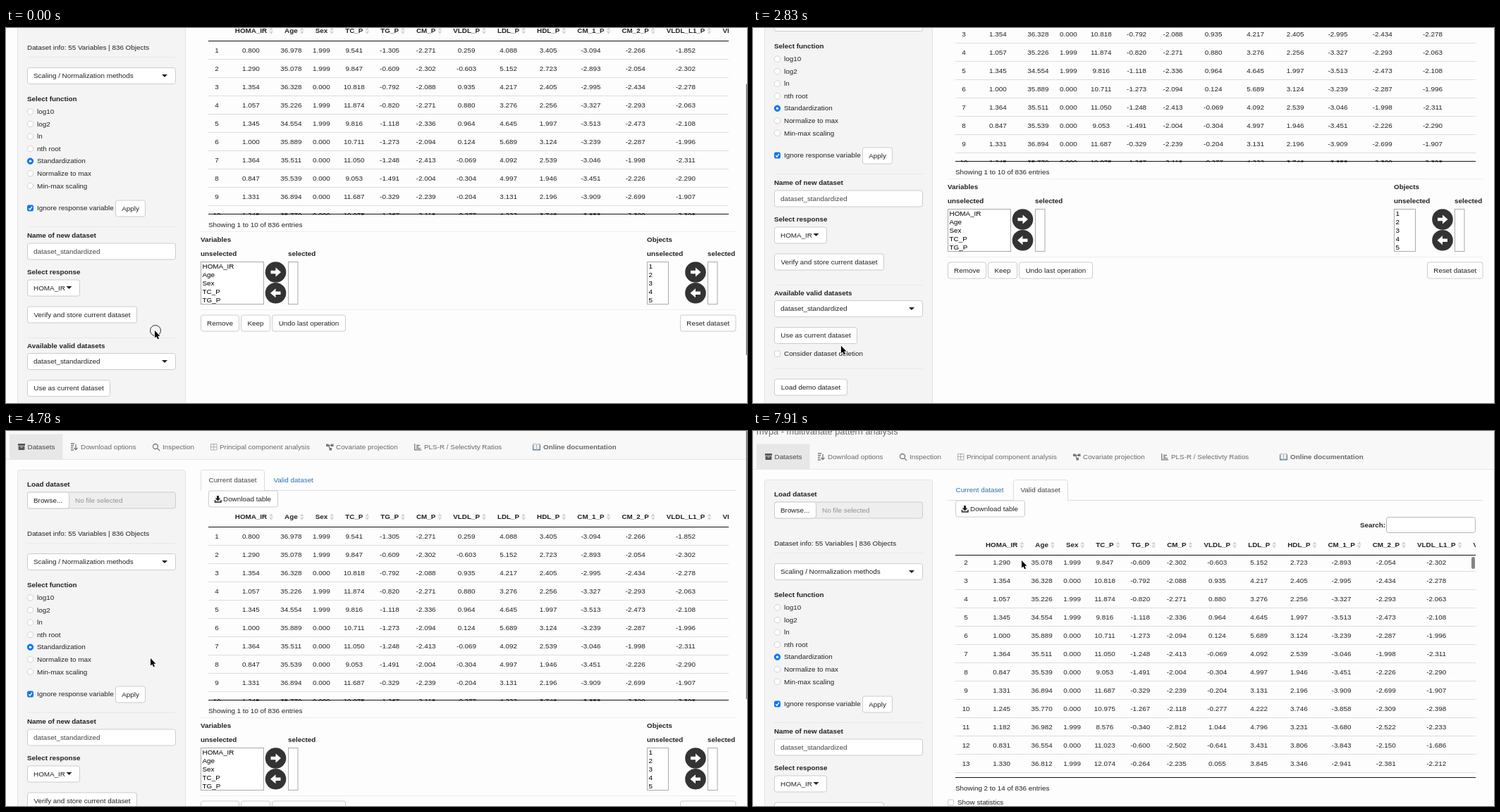
These frames come from a looping animation (1051x533 px, 8000 ms). An HTML page:

```html
<!DOCTYPE html>
<html lang="en">
<head>
<meta charset="utf-8">
<title>mvpa</title>
<style>
  html, body { margin: 0; width: 100%; height: 100%; overflow: hidden; background: #fdfdfd; }
  #stage { display: block; }
  text { font: 9.9px "Liberation Sans", Arial, sans-serif; fill: #222; white-space: pre; }
  .b { font-weight: bold; font-size: 9.84px; }
  .mid { text-anchor: middle; }
  .nav { fill: #696969; }
  .on, .input { fill: #444; }
  .hint { fill: #929292; }
  .link { fill: #2a70b0; }
  .option { fill: #000; }
  .brand { fill: #696969; font-size: 12.75px; }
</style>
</head>
<body>
<svg id="stage" width="1051" height="533"></svg>
<script>
const LOOP = 8000, STEP = 150;
const BG = '#fdfdfd', BLUE = '#0a76f5';

// Text and boxes are placed by their vertical centre.
const text = (x, y, s, cls = '') => `<text x="${x}" y="${y + 3.2}" class="${cls}">${s}</text>`;
const bold = (x, y, s) => text(x, y, s, 'b');
const path = (d, attrs = '') => `<path d="${d}" ${attrs}/>`;
const line = (x1, x2, y, color) => path(`M${x1} ${y}H${x2}`, `stroke="${color}"`);
const box = (x1, x2, y, h = 23, fill = '#fff', stroke = '#ccc', r = 3) =>
  `<rect x="${x1}" y="${y - h / 2}" width="${x2 - x1}" height="${h}" rx="${r}" fill="${fill}" stroke="${stroke}"/>`;
const disc = (x, y, r, fill, stroke = 'none') =>
  `<circle cx="${x}" cy="${y}" r="${r}" fill="${fill}" stroke="${stroke}"/>`;
const button = (x1, x2, y, label) => box(x1, x2, y) + text((x1 + x2) / 2, y, label, 'mid');
const caret = (x, y) => path(`M${x - 4} ${y - 2}h8l-4 4z`, 'fill="#222"');
const hr = y => line(30, 241, y, '#e9e9e9');
const clip = (x, y, w, h, body) =>
  `<svg x="${x}" y="${y}" width="${w}" height="${h}" viewBox="${x} ${y} ${w} ${h}">${body}</svg>`;

const checkbox = (x, y, label, on) =>
  box(x, x + 8, y, 8, on ? BLUE : '#fff', on ? BLUE : '#ccc', 1.5) +
  (on ? path(`M${x + 1.8} ${y + .2}l1.7 1.9 3-4.2`, 'fill="none" stroke="#fff" stroke-width="1.4"') : '') +
  text(x + 13.5, y, label);
const radio = (y, label, on) =>
  disc(34.5, y, 4.2, on ? BLUE : '#fff', on ? BLUE : '#d2d2d2') +
  (on ? disc(34.5, y, 1.8, '#fff') : '') + text(44, y, label);
const select = (y, label) => box(30.5, 240.5, y) + text(39, y, label) + caret(225, y);

const navbar = () => {
  const stroke = 'fill="none" stroke="#777" stroke-width="1.3"';
  return `<rect y="-60" width="1051" height="114" fill="#f8f8f8"/>` + line(0, 1051, 54.5, '#e7e7e7') +
    `<rect x="5" y="18.5" width="75.5" height="36" fill="#e7e7e7"/>` +
    text(5, 2, 'mvpa - multivariate pattern analysis', 'brand') +
    path('M17 32h10v2.7h-10zM17.6 35.4h8.8v5.6h-8.8z', 'fill="#555"') + line(20.5, 23.5, 37, '#e7e7e7') +
    text(30.5, 37, 'Datasets', 'on') +
    path('M92 32h5M92 35h4M92 38h3M92 41h4M99 33v7M96.5 38l2.5 2.5 2.5-2.5', stroke) +
    text(106, 37, 'Download options', 'nav') +
    path('M215 39l3 3', stroke) + `<circle cx="212" cy="36" r="3.5" ${stroke}/>` +
    text(222, 37, 'Inspection', 'nav') +
    path('M290.5 32.5h8.5v8.5h-8.5zM294.7 32.5v8.5M290.5 36.7h8.5',
      'fill="none" stroke="#888" stroke-width=".8" stroke-dasharray="1.5 .5"') +
    text(303, 37, 'Principal component analysis', 'nav') +
    path('M456 34.5h6M457 34.5l3 5', stroke) +
    path('M454 32.5h3.5v3.5h-3.5zM461 32.5h3.5v3.5h-3.5zM458.5 38h3.5v3.5h-3.5z', 'fill="#777"') +
    text(468, 37, 'Covariate projection', 'nav') +
    path('M579.7 32v8.8h9.5M582 34.5h5M582 36.6h3M582 38.7h6', stroke) +
    text(593, 37, 'PLS-R / Selectivty Ratios', 'nav') +
    path('M747 33.5h11v8h-11z', 'fill="#4a7fa5"') +
    path('M748 32.5q3-1 4.5 .8q1.5-1.8 4.5-.8v7.8q-3-.8-4.5 .7q-1.5-1.5-4.5-.7zM752.5 33.5v7',
      'fill="#eee" stroke="#888" stroke-width=".6"') +
    text(762, 37, 'Online documentation', 'b nav');
};

const sidebar = () =>
  `<rect x="16.5" y="69.5" width="238" height="690" rx="3" fill="#f4f4f4" stroke="#e3e3e3"/>` +
  bold(30, 90, 'Load dataset') +
  box(30.5, 240.5, 112.5, 23, '#eee') + box(30.5, 89.5, 112.5) +
  text(39, 112.5, 'Browse...') + text(98, 112.5, 'No file selected', 'hint') +
  text(30, 160, 'Dataset info: 55 Variables | 836 Objects') + hr(173.5) +
  select(200, 'Scaling / Normalization methods') +
  bold(30, 233, 'Select function') +
  ['log10', 'log2', 'ln', 'nth root', 'Standardization', 'Normalize to max', 'Min-max scaling']
    .map((label, i) => radio(251 + 17.55 * i, label, i === 4)).join('') +
  checkbox(30.5, 388, 'Ignore response variable', true) +
  button(155.5, 197.5, 388.5, 'Apply') + hr(414.5) +
  bold(30, 427, 'Name of new dataset') +
  box(30.5, 240.5, 449.5) + text(39, 449.5, 'dataset_standardized', 'input') +
  bold(30, 479, 'Select response') +
  box(30.5, 104.5, 501.5) + text(39, 501.5, 'HOMA_IR') + caret(89.5, 501) +
  button(30.5, 185.5, 539.5, 'Verify and store current dataset') + hr(572.5) +
  bold(30, 584, 'Available valid datasets') +
  select(606, 'dataset_standardized') +
  button(30.5, 147.5, 644, 'Use as current dataset') +
  checkbox(30.5, 670, 'Consider dataset deletion') + hr(691.5) +
  button(30.5, 133.5, 717.5, 'Load demo dataset');

const pen = document.createElement('canvas').getContext('2d');
pen.font = 'bold 9.84px "Liberation Sans", Arial, sans-serif';

// Name, mean and spread; each column is as wide as its heading plus padding.
let edge = 312.3;
const columns = [
  ['HOMA_IR', 1.1, .3], ['Age', 35.8, 1.4], ['Sex'], ['TC_P', 10.3, 1.8], ['TG_P', -.9, .7],
  ['CM_P', -2.5, .5], ['VLDL_P', .2, .9], ['LDL_P', 4.6, 1.5], ['HDL_P', 2.8, 1.2],
  ['CM_1_P', -3.4, .6], ['CM_2_P', -2.3, .4], ['VLDL_L1_P', -2, .4], ['VLDL_L2_P', -2, .4]
].map(([name, mean, spread]) => {
  const width = pen.measureText(name).width, x = edge + 12.5 + width / 2;
  edge += width + 25;
  return { name, mean, spread, width, x };
});

let seed = 7;
const random = () => (seed = seed * 16807 % 2147483647) / 2147483647;
const isMale = row => row % 3 && (row < 6 || row > 10);
const rows = Array.from({ length: 13 }, (_, r) => columns.map(({ name, mean, spread }) =>
  name === 'Sex' ? (isMale(r + 1) ? '1.999' : '0.000') : (mean + spread * (2 * random() - 1)).toFixed(3)));

const table = (headY, bottom, shift, id) => {
  const heads = columns.map(({ name, width, x }) => {
    const arrow = x + shift + width / 2 + 3;
    return text(x + shift, headY, name, 'b mid') +
      path(`M${arrow} ${headY - .7}h6l-3-4zM${arrow} ${headY + .7}h6l-3 4z`, 'fill="#d4d4d4"');
  }).join('');
  const body = rows.map((cells, r) => {
    const y = headY + 28 + 26 * r;
    return text(299 + shift * .6, y, r + 1, 'mid') + line(287, 1025, y + 12.5, '#ddd') +
      cells.map((value, c) => text(columns[c].x + shift, y, value, 'mid')).join('');
  }).join('');
  return line(287, 1025, headY + 14.5, '#111') + line(287, 1025, bottom, '#111') +
    clip(287, headY - 12, 738, 26, heads) +
    clip(287, headY + 15, 738, bottom - headY - 13.5, `<g id="${id}">${body}</g>`);
};

const tabs = validActive => {
  const [x1, x2] = validActive ? [369.5, 446.5] : [276.5, 366.5];
  return line(276, 1035, 98.5, '#ddd') +
    (validActive ? '' : '<rect id="hover" x="369" y="69" width="78" height="29" rx="3" fill="#eee"/>') +
    path(`M${x1} 99V72.5q0-3 3-3H${x2 - 3}q3 0 3 3V99`, `fill="${BG}" stroke="#ddd"`) +
    text(287.5, 84, 'Current dataset', validActive ? 'link' : 'on') +
    text(379.5, 84, 'Valid dataset', validActive ? 'on' : 'link') +
    box(287.5, 385.5, 110.5) + text(308, 110.5, 'Download table') +
    path('M299 106h3v3.5h2.5l-4 4-4-4h2.5z', 'fill="#222"') +
    path('M296.5 112v3h8.5v-3', 'fill="none" stroke="#222" stroke-width="1.5"');
};

const picker = (x, title, listEnd, arrowX, chosenX, items) => {
  const arrow = (y, dir) => disc(arrowX, y, 14.8, '#333') +
    path('M-7-2.3h7v-4.2l7.5 6.5-7.5 6.5v-4.2h-7z', `fill="#fff" transform="translate(${arrowX} ${y}) scale(${dir} 1)"`);
  return bold(x, 433, title) + bold(x, 452.5, 'unselected') + bold(chosenX, 452.5, 'selected') +
    box(x + .5, listEnd, 494.5, 60, '#fff', '#aaa', 0) + box(chosenX + .5, chosenX + 14, 494.5, 60, '#fff', '#aaa', 0) +
    items.map((item, i) => text(x + 2.5, 470.7 + 11.9 * i, item, 'option')).join('') +
    arrow(479, 1) + arrow(508.7, -1);
};

const currentPanel = () => tabs(false) + table(136, 396.5, 0, 'currentRows') +
  text(287, 411.5, 'Showing 1 to 10 of 836 entries') + line(276, 1035, 421.5, '#eee') +
  picker(276, 'Variables', 365.5, 382.5, 400, columns.filter((_, i) => i < 5).map(c => c.name)) +
  picker(909, 'Objects', 939.5, 978, 995, [1, 2, 3, 4, 5]) + line(276, 1035, 532.5, '#eee') +
  button(276.5, 330.5, 551.5, 'Remove') + button(333.5, 374.5, 551.5, 'Keep') +
  button(377.5, 481.5, 551.5, 'Undo last operation') + button(956.5, 1035, 551.5, 'Reset dataset');

const validPanel = () => tabs(true) +
  bold(861, 133.5, 'Search:') + box(898.5, 1024.5, 133.5, 22, '#fff', '#b5b5b5') +
  table(162, 492.5, 5.2, 'validRows') +
  '<rect id="thumb" x="1019" y="179" width="5" height="17" rx="2.5" fill="#858585"/>' +
  '<text id="showing" x="287" y="511"></text>' +
  checkbox(276.5, 528, 'Show statistics');

const $ = id => document.getElementById(id);
$('stage').innerHTML = `<g id="page">${navbar()}${sidebar()}
  <g id="current">${currentPanel()}</g><g id="valid">${validPanel()}</g></g>
  <rect id="bar" x="1049.8" width="2" height="385" fill="#666"/>
  <g id="cursor"><circle id="click" cx="1" r="7.5" fill="none" stroke="#333"/>
  <path d="M0 0V10.5L2.4 8.4 4.1 12.3 6 11.5 4.3 7.7H7.5Z" stroke="#fff" stroke-width="1.4" paint-order="stroke"/></g>`;

const easeOut = p => 1 - (1 - p) ** 2;
const easeInOut = p => p * p * (3 - 2 * p);

// Each move has its start, its number of steps and the value it reaches.
const track = (start, ease, ...moves) => t => moves.reduce((value, [at, steps, goal]) => {
  const done = Math.max(0, Math.min(steps, 1 + Math.floor((t - at) / STEP)));
  return value + (goal - value) * ease(done / steps);
}, start);

const scrollAt = track(132, easeOut, [150, 4, 156], [1790, 1, 185], [1940, 2, 207], [4330, 4, 14], [4930, 2, 0]);
const cursorX = track(211, easeInOut, [2380, 7, 69], [3430, 6, 205], [5080, 5, 412], [5830, 4, 411], [7170, 2, 381]);
const cursorY = track(430, easeInOut, [2380, 7, 466], [3430, 6, 323], [5080, 5, 99], [5830, 4, 83], [7170, 2, 184]);
const barOpacity = track(1, easeOut, [2380, 2, 0], [4330, 1, 1], [5830, 2, 0]);
const clickOpacity = track(1, easeOut, [150, 1, 0], [6730, 1, 1], [6880, 1, 0]);
const tableScrollAt = track(0, easeOut, [7610, 3, 29]);

const show = (id, on) => $(id).setAttribute('display', on ? 'inline' : 'none');
const move = (id, x, y) => $(id).setAttribute('transform', `translate(${x} ${y})`);

function draw(now) {
  const t = now % LOOP, scroll = Math.round(scrollAt(t)), tableScroll = Math.round(tableScrollAt(t));
  const x = cursorX(t), y = cursorY(t);
  move('page', 0, -scroll);
  move('cursor', x, y);
  move('validRows', 0, -tableScroll);
  move('bar', 0, -14 + .71 * scroll);
  $('bar').setAttribute('opacity', barOpacity(t));
  show('click', clickOpacity(t));
  show('current', t < 6730);
  show('valid', t >= 6730);
  show('hover', scroll === 0 && x > 369 && x < 447 && y > 69 && y < 98);
  show('thumb', tableScroll);
  $('showing').textContent =
    `Showing ${1 + Math.floor(tableScroll / 26)} to ${Math.ceil((tableScroll + 316) / 26)} of 836 entries`;
  requestAnimationFrame(draw);
}
draw(performance.now());
</script>
</body>
</html>
```
